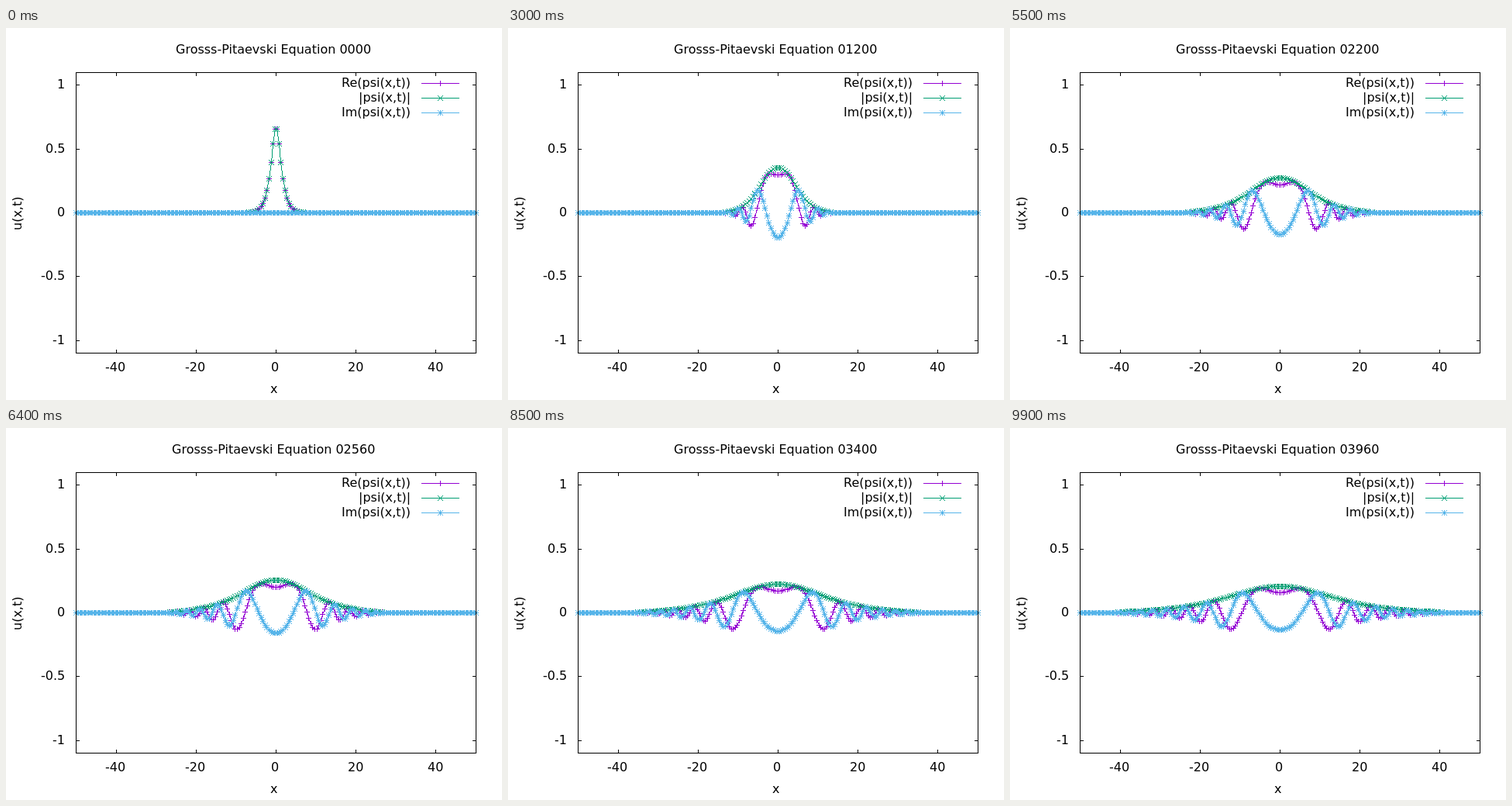
Write an HTML page with a canvas that moves like this. It is 640 by 480 pixels and loops after 10 s.

```html
<!DOCTYPE html>
<html lang="en">
<head>
<meta charset="utf-8">
<title>Wave packet</title>
<style>
html, body { margin: 0; width: 100%; height: 100%; overflow: hidden; background: #fff; }
canvas { display: block; width: 640px; height: 480px; }
</style>
</head>
<body>
<canvas id="plot" width="640" height="480"></canvas>
<script>
const ctx = document.getElementById('plot').getContext('2d');
const FRAMES = 100, FRAME_MS = 100, STEPS = 40, DT = 0.005;
const LEFT = 90, RIGHT = 606, TOP = 57, BOTTOM = 419;
const N = 202, DX = 100 / (N - 1), WIDTH = 0.9;
const PURPLE = '#9400d3', GREEN = '#009e73', BLUE = '#56b4e9';

const mapX = x => LEFT + (x + 50) * (RIGHT - LEFT) / 100;
const px = x => Math.round(mapX(x));
const py = v => Math.round(BOTTOM - (v + 1.1) * (BOTTOM - TOP) / 2.2);
const xs = Array.from({ length: N }, (_, j) => -50 + j * DX);

// Cosine modes of the discrete free Schrödinger equation (even ones only)
const modes = [];
for (let m = 0; m < N; m += 2) {
  const shape = xs.map((_, j) => Math.cos(Math.PI * m * (j + 0.5) / N));
  let c = 0;
  xs.forEach((x, j) => c += Math.sqrt(WIDTH / 2) / Math.cosh(WIDTH * x) * shape[j]);
  modes.push({
    shape,
    amp: c * (m ? 2 : 1) / N,
    energy: (1 - Math.cos(Math.PI * m / N)) / (DX * DX)
  });
}

function evolve(t) {
  const re = new Float64Array(N), im = new Float64Array(N);
  for (const { shape, amp, energy } of modes) {
    const a = amp * Math.cos(energy * t), b = -amp * Math.sin(energy * t);
    for (let j = 0; j < N; j++) {
      re[j] += a * shape[j];
      im[j] += b * shape[j];
    }
  }
  return { re, im, abs: re.map((r, j) => Math.hypot(r, im[j])) };
}

const dot = (x, y, w = 1, h = 1) => ctx.fillRect(x, y, w, h);

// Crisp one-pixel line
function line(x0, y0, x1, y1) {
  const n = Math.max(Math.abs(x1 - x0), Math.abs(y1 - y0));
  for (let i = 0; i <= n; i++) {
    const k = n ? i / n : 0;
    dot(Math.round(x0 + (x1 - x0) * k), Math.round(y0 + (y1 - y0) * k));
  }
}

function plus(x, y) {
  dot(x - 3, y, 7, 1);
  dot(x, y - 3, 1, 7);
}

function cross(x, y) {
  for (let i = -3; i <= 3; i++) {
    dot(x + i, y + i);
    dot(x + i, y - i);
  }
}

function star(x, y) {
  plus(x, y);
  cross(x, y);
}

// align: 0 left, 0.5 centre, 1 right
function text(s, x, y, align) {
  ctx.fillText(s, Math.floor(x - ctx.measureText(s).width * align), y);
}

function curve(values, color, mark) {
  ctx.fillStyle = color;
  for (let j = 0; j < N; j++) {
    const x = px(xs[j]), y = py(values[j]);
    if (j) line(px(xs[j - 1]), py(values[j - 1]), x, y);
    mark(x, y);
  }
}

function legend(label, y, color, mark) {
  ctx.fillStyle = '#000';
  text(label, 522.5, y + 5, 1);
  ctx.fillStyle = color;
  dot(536, y, 49, 1);
  mark(560, y);
}

function tics() {
  for (let v = -40; v <= 40; v += 20) {
    dot(px(v), TOP, 1, 5);
    dot(px(v), BOTTOM - 4, 1, 5);
    text(String(v), mapX(v), 443, 0.5);
  }
  for (let v = -1; v <= 1; v += 0.5) {
    const y = py(v);
    dot(LEFT, y, 5, 1);
    dot(RIGHT - 4, y, 5, 1);
    text(String(v), 76.5, y + 5, 1);
  }
}

function labels(step) {
  text('Grosss-Pitaevski Equation 0' + String(step).padStart(3, '0'), 346, 33, 0.5);
  text('x', 346, 471, 0.5);
  ctx.save();
  ctx.translate(20, 239);
  ctx.rotate(-Math.PI / 2);
  text('u(x,t)', 0, 0, 0.5);
  ctx.restore();
}

function border() {
  ctx.fillStyle = '#000';
  dot(LEFT, TOP, RIGHT - LEFT + 1, 1);
  dot(LEFT, BOTTOM, RIGHT - LEFT + 1, 1);
  dot(LEFT, TOP, 1, BOTTOM - TOP + 1);
  dot(RIGHT, TOP, 1, BOTTOM - TOP + 1);
}

function draw(frame) {
  const step = frame * STEPS;
  const psi = evolve(step * DT);
  ctx.fillStyle = '#fff';
  dot(0, 0, 640, 480);
  ctx.font = '16px "DejaVu Sans", sans-serif';
  ctx.fillStyle = '#000';
  tics();
  labels(step);
  legend('Re(psi(x,t))', 71, PURPLE, plus);
  legend('|psi(x,t)|', 90, GREEN, cross);
  legend('Im(psi(x,t))', 109, BLUE, star);
  curve(psi.re, PURPLE, plus);
  curve(psi.abs, GREEN, cross);
  curve(psi.im, BLUE, star);
  border();
}

let shown = 0;
const start = performance.now();
function tick() {
  const frame = Math.floor(Math.max(0, performance.now() - start) / FRAME_MS) % FRAMES;
  if (frame !== shown) draw(shown = frame);
  requestAnimationFrame(tick);
}
draw(0);
tick();
</script>
</body>
</html>
```
